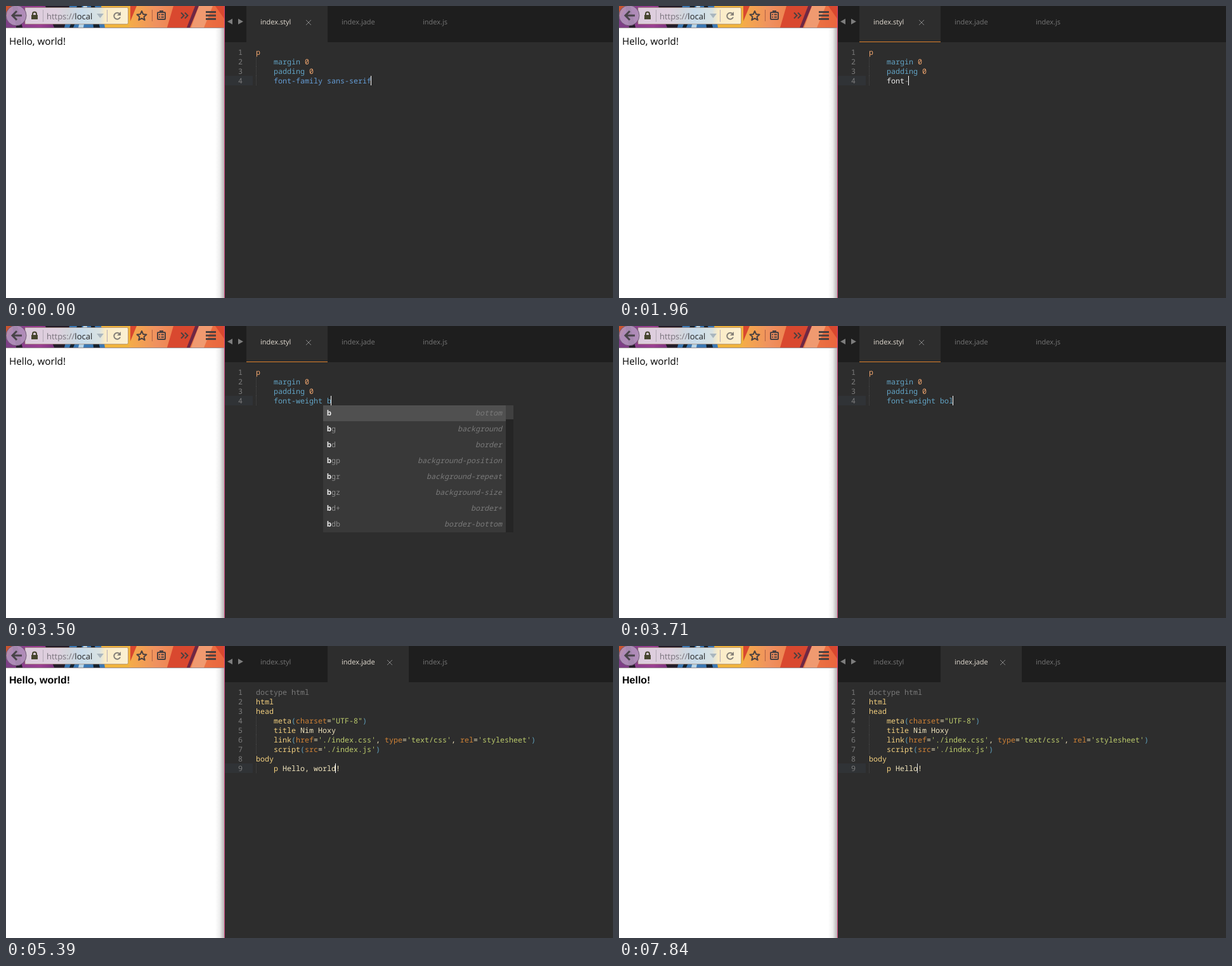
These frames come from a looping animation (957x460 px, 8 s). An HTML page:

```html
<!DOCTYPE html>
<html lang="en">
<head>
<meta charset="utf-8">
<title>Live style editing</title>
<style>
  html, body { margin: 0; width: 100%; height: 100%; overflow: hidden; background: #2d2d2d; }
  svg { display: block; width: 957px; height: 460px; }
  text { text-rendering: geometricPrecision; }
  .ui { font-family: "Open Sans", "Noto Sans", sans-serif; }
  .code { font: 11.667px "Noto Sans Mono", "DejaVu Sans Mono", monospace; }
  .num { fill: #7d7d7d; text-anchor: end; }
  .tab { font-size: 11px; fill: #757575; }
  .tab.on { fill: #e4ddd2; }
  .plain { font: 15.25px "Open Sans", sans-serif; }
  .bold { font: bold 16px "Liberation Sans", Arial, sans-serif; }
  .hint { fill: #7a7a7a; font-style: italic; text-anchor: end; }
  .guide { stroke: #4a4a4a; stroke-dasharray: 1 1; }
  .o { fill: #f0a56e; } .b { fill: #62a3c4; } .v { fill: #659dd6; }
  .w { fill: #ececec; } .d { fill: #9a9a9a; } .c { fill: #787878; }
  .y { fill: #f2cf7e; } .t { fill: #f0e4bd; } .a { fill: #d08236; }
  .g { fill: #bccb6c; } .p { fill: #5fa0bb; }
</style>
</head>
<body>
<svg viewBox="0 0 957 460">
  <defs>
    <linearGradient id="fade"><stop offset="0" stop-color="#fff"/><stop offset=".5" stop-color="#eee"/><stop offset="1" stop-color="#b4b0b2"/></linearGradient>
    <linearGradient id="warm"><stop offset="0" stop-color="#f5ad48"/><stop offset=".3" stop-color="#ef9060"/><stop offset=".6" stop-color="#ee7b45"/><stop offset="1" stop-color="#e9663f"/></linearGradient>
    <linearGradient id="plum"><stop offset="0" stop-color="#7c3f86"/><stop offset=".6" stop-color="#9b3f92"/><stop offset="1" stop-color="#6d2e74"/></linearGradient>
    <linearGradient id="field"><stop offset="0" stop-color="#dccbdc"/><stop offset=".3" stop-color="#dfd0df"/><stop offset=".42" stop-color="#d3d6dc"/><stop offset=".55" stop-color="#c9dcea"/><stop offset=".72" stop-color="#d9e2e2"/><stop offset=".78" stop-color="#fbecc6"/><stop offset="1" stop-color="#fbf0d4"/></linearGradient>
    <clipPath id="bar"><path d="M0 0H344V34H0z"/></clipPath>
  </defs>

  <!-- browser -->
  <path fill="#fff" d="M0 0H344V460H0z"/>
  <path fill="url(#fade)" d="M330 35H344V460H330z"/>
  <g clip-path="url(#bar)">
    <path fill="url(#plum)" d="M0 0H90V34H0z"/>
    <path fill="#c9552f" d="M0 0H12L4 14 0 20z"/>
    <path fill="#241c2a" d="M10 0H18L26 34H16zM62 0H104L96 34H76z"/>
    <path fill="#3b78b4" d="M100 0H152L158 34H92z"/>
    <path fill="#15212e" d="M112 0H120L106 34H100zM134 0H140L148 34H138z"/>
    <path fill="#b8d4e6" d="M122 0H128L122 34H114z"/>
    <path fill="#f0b33d" d="M150 0H205L196 34H156z"/>
    <path fill="url(#warm)" d="M204 0H344V34H193z"/>
    <path fill="#d9482f" d="M196 0H206L196 24zM264 0H298L286 34H254zM330 0H344V20z"/>
    <path fill="#f09a70" d="M304 0H326L312 34H292z"/>
    <path fill="#6e2744" d="M298 0H304L290 34H285z"/>
  </g>
  <path stroke="#9a8f92" d="M0 34.5H344"/>
  <path fill="url(#field)" stroke="#a0826c" stroke-opacity=".65" d="M30 2.5H190.500Q192.500 2.500 192.500 4.500V26.500Q192.500 28.500 190.500 28.500H30z"/>
  <circle cx="16" cy="15" r="16" fill="#b394bd" fill-opacity=".9" stroke="#6d5473"/>
  <path fill="none" stroke="#484349" stroke-width="3" d="M25 15H11M17 8L10 15 17 22"/>
  <path fill="#47462f" d="M40 14H50V21H40z"/>
  <path fill="none" stroke="#47462f" stroke-width="2" d="M42 15V12.500A3 3 0 0 1 48 12.500V15"/>
  <path stroke="#b4a9b6" d="M58.500 6V25M159.500 6V25"/>
  <text class="ui" x="64" y="21" font-size="13" fill="#77717a">https://<tspan fill="#222">local</tspan></text>
  <path fill="#aab6be" d="M143 12H154L148.500 19z"/>
  <path fill="none" stroke="#858078" stroke-width="2" d="M179.500 13A5 5 0 1 0 180 17.500"/>
  <path fill="#858078" d="M181 9V15H175z"/>
  <path fill="none" stroke="#4b4140" stroke-width="2" stroke-linejoin="round" d="M214 8L216.200 12.900 221.500 13.400 217.500 17 218.700 22.200 214 19.400 209.300 22.200 210.500 17 206.500 13.400 211.800 12.900z"/>
  <path stroke="#b06044" d="M230.500 6V24"/>
  <rect x="239" y="10" width="12" height="11" rx="1" fill="none" stroke="#4b4140" stroke-width="2"/>
  <path stroke="#4b4140" stroke-width="2" d="M241 13.500H243M244.500 13.500H249M241 17.500H243M244.500 17.500H249M242 8H248"/>
  <path fill="none" stroke="#4b4140" stroke-width="2" d="M276 10.500L280.500 15 276 19.500M282 10.500L286.500 15 282 19.500"/>
  <path stroke="#4b4140" stroke-width="3" d="M315 9.500H331M315 15H331M315 20.500H331"/>
  <text id="page" x="5"></text>

  <!-- editor -->
  <path fill="#2d2d2d" d="M345 0H957V460H345z"/>
  <path fill="#1e1e1e" d="M345 0H957V57H345z"/>
  <path fill="#d2427c" d="M344 0H345V460H344z"/>
  <path fill="#7d7d7d" d="M357 20V29L349 24.500zM366 20V29L374 24.500z"/>
  <g id="active">
    <path fill="#2d2d2d" d="M379 0H507V57H379z"/>
    <path stroke="#858585" d="M473 22L481 30M481 22L473 30"/>
    <path id="dirty" fill="#dd7f2a" d="M379 56H507V57H379z"/>
  </g>
  <g id="tabs" class="ui">
    <text class="tab" x="401" y="29">index.styl</text>
    <text class="tab" x="529" y="29">index.jade</text>
    <text class="tab" x="657" y="29">index.js</text>
  </g>
  <rect id="row" x="345" width="44" height="15" fill="#303336"/>
  <rect id="sel" height="15" rx="2" fill="#596688"/>
  <g id="code" class="code"></g>
  <rect id="caret" width="1" height="15" fill="#fff"/>
  <g id="popup" class="code">
    <path fill="#393939" d="M500 125H788V325H500z"/>
    <path fill="#505050" d="M500 125H788V150H500z"/>
    <path fill="#252525" d="M788 125H800V325H788z"/>
    <path fill="#404040" d="M788 125H800V147H788z"/>
  </g>
</svg>
<script>
const LOOP = 8000, LEFT = 394, TOP = 65, ROW = 15, CHAR = 7;
const $ = id => document.getElementById(id);
const set = (el, attrs) => { for (const k in attrs) el.setAttribute(k, attrs[k]); };

// Each line is split by "|"; the first letter of a part is its colour class.
const files = [
  ['op', '_    |bmargin |o0', '_    |bpadding |o0'],
  ['cdoctype html', 'yhtml', 'yhead',
   '_    |ymeta|p(|acharset|t=|g"UTF-8"|p)',
   '_    |ytitle |tNim Hoxy',
   "_    |ylink|p(|ahref|t=|g'./index.css'|t, |atype|t=|g'text/css'|t, |arel|t=|g'stylesheet'|p)",
   "_    |yscript|p(|asrc|t=|g'./index.js'|p)",
   'ybody']
];

const hints = ['b bottom', 'bg background', 'bd border', 'bgp background-position',
  'bgr background-repeat', 'bgz background-size', 'bd+ border+', 'bdb border-bottom'];
$('popup').innerHTML += hints.map((hint, i) => {
  const [abbr, full] = hint.split(' '), y = 141 + i * 25;
  return `<text x="506" y="${y}" fill="#8c8c8c"><tspan font-weight="bold" fill="#eee">b</tspan>${abbr.slice(1)}</text>` +
    `<text class="hint" x="782" y="${y}">${full}</text>`;
}).join('');

// Timeline: every step changes part of the state.
const steps = [[0, {
  tab: 0, text: 'font-family sans-serif', col: 26, anchor: null,
  caret: 1, dirty: 0, popup: false, page: 'Hello, world!', bold: false
}]];
const at = (time, change) => steps.push([time, change]);
const type = (before, added, times) => times.forEach((time, i) => {
  const text = before + added.slice(0, i + 1);
  at(time, { text, col: 4 + text.length, popup: false });
});
const fadeCaret = time => [.66, .33, 0].forEach((caret, i) => at(time + i * 70, { caret }));
const select = (anchor, moves) => moves.forEach(([time, col]) => at(time, { anchor, col, caret: 1 }));

select(26, [[140, 21], [210, 20], [350, 16], [420, 9], [560, 8], [630, 4]]);
at(980, { text: '', anchor: null, dirty: .5 });
at(1050, { dirty: 1 });
type('', 'font-', [1400, 1540, 1680, 1820, 1960]);
type('font-', 'weight', [2240, 2310, 2450, 2520, 2660, 2730]);
type('font-weight', ' ', [3080]);
type('font-weight ', 'b', [3430]);
at(3500, { popup: true });
type('font-weight b', 'old', [3570, 3710, 3850]);
fadeCaret(4200);
at(4480, { dirty: .5 });
at(4550, { dirty: 0 });
at(4830, { bold: true });
at(5110, { tab: 1, text: 'Hello, world!', col: 19, caret: 1 });
at(5390, { col: 18 });
fadeCaret(5740);
select(18, [[6370, 13], [6510, 12], [6720, 11]]);
at(7000, { text: 'Hello!', anchor: null, dirty: .5 });
at(7070, { dirty: 1 });
at(7280, { dirty: .5 });
at(7350, { dirty: 0 });
at(7420, { page: 'Hello!' });
at(7770, { caret: .9 });
at(7840, { caret: .8 });

function lineMarkup(line, i) {
  const y = TOP + i * ROW + 12;
  let x = LEFT, parts = '';
  for (const part of line.split('|')) {
    const kind = part[0], text = part.slice(1);
    if (kind !== '_') parts += `<tspan class="${kind}" x="${x}">${text}</tspan>`;
    x += text.length * CHAR;
  }
  const guide = line[0] === '_' && x > LEFT + 4 * CHAR
    ? `<path class="guide" d="M394.500 ${y - 12}v${ROW}"/>` : '';
  return `${guide}<text class="num" x="373" y="${y}">${i + 1}</text><text y="${y}">${parts}</text>`;
}

function editedLine({ tab, text }) {
  if (tab) return '_    |yp |t' + text;
  if (text.includes(' ')) return `_    |${text.includes('family') ? 'v' : 'b'}${text}`;
  return '_    |w' + text.replace('-', '|d-|w');
}

function draw(s) {
  const lines = [...files[s.tab], editedLine(s)];
  const y = TOP + (lines.length - 1) * ROW;
  const x = LEFT + s.col * CHAR;
  $('code').innerHTML = lines.map(lineMarkup).join('');
  set($('row'), { y });
  set($('sel'), { x, y, width: s.anchor === null ? 0 : (s.anchor - s.col) * CHAR });
  set($('caret'), { x: x - 1, y, opacity: s.caret });
  set($('dirty'), { opacity: s.dirty });
  set($('active'), { transform: `translate(${s.tab * 128} 0)` });
  set($('popup'), { visibility: s.popup ? 'visible' : 'hidden' });
  [...$('tabs').children].forEach((el, i) => el.classList.toggle('on', i === s.tab));
  set($('page'), { class: s.bold ? 'bold' : 'plain', y: s.bold ? 59 : 61 });
  $('page').textContent = s.page;
}

let shown = 0;
function tick() {
  const time = performance.now() % LOOP;
  const count = steps.filter(([start]) => start <= time).length;
  if (count !== shown) {
    shown = count;
    draw(Object.assign({}, ...steps.slice(0, count).map(step => step[1])));
  }
  requestAnimationFrame(tick);
}
tick();
</script>
</body>
</html>
```
